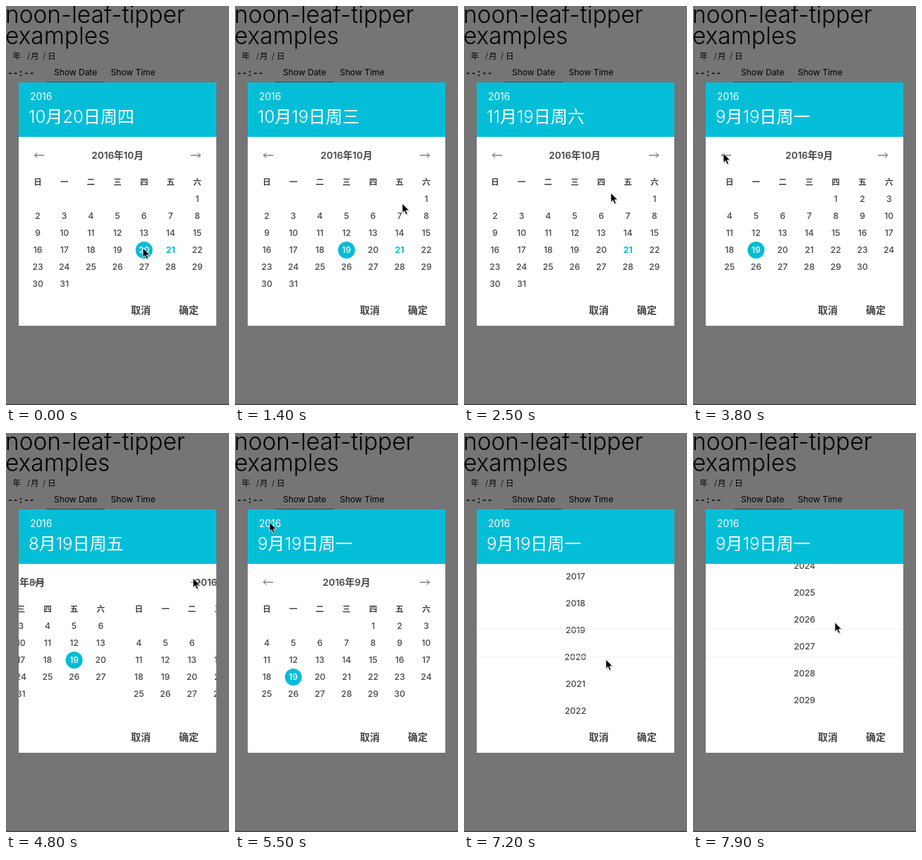
An HTML page for the animation above (8 s loop, 316x564 px).

```html
<!DOCTYPE html>
<html lang="zh">
<head>
<meta charset="utf-8">
<title>Date dialog</title>
<style>
  html, body { margin: 0; width: 100%; height: 100%; overflow: hidden; background: #757575; }
  svg { display: block; width: 316px; height: 564px; }
  text { font-family: Inter, "Noto Sans CJK SC", "Noto Sans CJK", sans-serif; white-space: pre; }
  .heading { font-size: 33.4px; font-weight: 300; }
  .button { font-size: 12px; }
  .field { font-size: 11.5px; font-weight: 300; }
  .clock { font: bold 12.8px "Liberation Mono", monospace; }
  .head { fill: #fff; }
  .date { font-size: 24px; font-weight: 350; }
  .year { font-size: 13.8px; }
  .mid { text-anchor: middle; fill: #444; }
  .title { font-size: 13.5px; font-weight: 600; }
  .week { font-size: 11.5px; font-weight: 600; }
  .cell { font-size: 12.2px; font-weight: 450; }
  .cell.now { fill: #04bcd6; font-weight: 700; }
  .cell.on { fill: #fff; }
  .action { font-size: 14px; font-weight: 600; fill: #444; }
  .arrow { fill: none; stroke: #444; }
</style>
</head>
<body>
<svg viewBox="0 0 316 564">
  <defs>
    <clipPath id="viewClip"><rect x="18" y="185" width="280" height="224"/></clipPath>
  </defs>
  <rect width="316" height="564" fill="#757575"/>
  <text class="heading" x="-1" y="24">noon-leaf-tipper</text>
  <text class="heading" x="-1" y="54">examples</text>
  <g class="field">
    <text x="9.5" y="75">年</text><text x="30" y="75">/</text>
    <text x="35" y="75">月</text><text x="52" y="75">/</text>
    <text x="59" y="75">日</text>
  </g>
  <text class="clock" x="2" y="99">--:--</text>
  <text class="button" x="68" y="98">Show Date</text>
  <text class="button" x="148.500" y="98">Show Time</text>
  <rect x="57" y="107" width="83" height="1" fill="#404040"/>
  <rect y="562.5" width="316" height="1.5" fill="#4b4045"/>

  <rect x="18" y="108" width="280" height="344" fill="#fff"/>
  <rect x="18" y="108" width="280" height="77" fill="#04bed8"/>
  <text class="head year" x="34" y="133">2016</text>
  <text class="head date" id="date" x="32" y="165"></text>

  <g clip-path="url(#viewClip)" id="view"></g>
  <g class="arrow" id="arrows">
    <path d="M54 211H40.500M44 207.500l-3.500 3.500 3.500 3.500"/>
    <path d="M262 211h13.500M272 207.500l3.500 3.500-3.500 3.500"/>
  </g>
  <g id="lines" fill="#f2f2f2">
    <rect x="18" y="277" width="280" height="1"/>
    <rect x="18" y="316" width="280" height="1"/>
  </g>
  <text class="action" x="177" y="435">取消</text>
  <text class="action" x="245" y="435">确定</text>

  <g id="cursor">
    <path d="M1 1.500V15l3-2.800 2 4.800 2.500-1-2-4.600h4.300z" opacity=".2"/>
    <path d="M0 0V13.500l3-2.800 2.100 5 2.400-1-2.100-4.800h4.300z" stroke="#fff" stroke-width=".9"/>
  </g>
</svg>
<script>
const LOOP = 8000, STEP = 100, WIDTH = 280, MOVE = 400;
const PICK_AT = 500, YEARS_AT = 5800, DRAG_AT = 6200, FLING_AT = 6600;
const WEEK = [...'日一二三四五六'];
const $ = id => document.getElementById(id);

// Month turns: two drags, then three clicks on the arrows
const turns = [
  { at: 1410, dur: 400, by: 1 },
  { at: 2018, dur: 500, by: -1 },
  { at: 3150, dur: 130, by: -1 },
  { at: 3788, dur: 130, by: -1 },
  { at: 4736, dur: 130, by: 1 }
];
// Where the pointer heads, and when it sets off
const moves = [
  { at: 100, x: 158, y: 345 },
  { at: 1000, x: 237, y: 279 },
  { at: 1410, x: 100, y: 268 },
  { at: 2050, x: 208, y: 264 },
  { at: 2650, x: 43, y: 208 },
  { at: 4200, x: 265, y: 205 },
  { at: 5080, x: 49, y: 126 },
  { at: YEARS_AT, x: 201, y: 260 }
];

// Smooth progress from 0 to 1
function ease(t, at, dur) {
  const u = Math.min(1, Math.max(0, (t - at) / dur));
  return u * u * (3 - 2 * u);
}

const label = (x, y, cls, s) => `<text class="mid ${cls}" x="${x}" y="${y}">${s}</text>`;
const colX = c => 45 + c * 37.667;

function monthPage(month, picked, day) {
  const lead = new Date(2016, month - 1, 1).getDay();
  const count = new Date(2016, month, 0).getDate();
  let out = label(158, 216, 'title', `2016年${month}月`);
  WEEK.forEach((w, c) => out += label(colX(c), 253, 'week', w));
  for (let d = 1; d <= count; d++) {
    const n = lead + d - 1;
    const x = colX(n % 7), y = 277 + 24 * Math.floor(n / 7);
    const on = month === picked && d === day;
    const now = month === 10 && d === 21;
    if (on) out += `<circle cx="${x}" cy="${y - 4}" r="12" fill="#04bcd6"/>`;
    out += label(x, y, on ? 'cell on' : now ? 'cell now' : 'cell', d);
  }
  return out;
}

function monthView(t, picked, day) {
  const pos = turns.reduce((p, { at, dur, by }) => p + by * ease(t, at, dur), 10);
  let out = '';
  for (let m = Math.floor(pos); m <= Math.ceil(pos); m++)
    out += `<g transform="translate(${(m - pos) * WIDTH})">${monthPage(m, picked, day)}</g>`;
  return out;
}

function yearView(t) {
  const mid = 2016 - 2.38 * ease(t, DRAG_AT, 200) + 13.26 * ease(t, FLING_AT, 1300);
  let out = '';
  for (let y = Math.floor(mid) - 3; y <= mid + 4; y++)
    out += label(158, 301.5 + (y - mid) * 38, y === 2016 ? 'cell now' : 'cell', y);
  return out;
}

function pointer(t) {
  let x = 194, y = 342;
  for (const m of moves) {
    const k = ease(t, m.at, MOVE);
    x += (m.x - x) * k;
    y += (m.y - y) * k;
  }
  if (t > DRAG_AT) y += 46 * (1 - Math.cos((t - DRAG_AT) / 435 * 2 * Math.PI));
  return [x, y];
}

function draw(t) {
  const month = turns.reduce((m, { at, dur, by }) => t >= at + dur ? m + by : m, 10);
  const day = t < PICK_AT ? 20 : 19;
  const inYears = t >= YEARS_AT;
  const weekday = WEEK[new Date(2016, month - 1, day).getDay()];
  $('date').textContent = `${month}月${day}日周${weekday}`;
  $('view').innerHTML = inYears ? yearView(t) : monthView(t, month, day);
  $('arrows').style.display = inYears ? 'none' : '';
  $('lines').style.display = inYears ? '' : 'none';
  $('cursor').setAttribute('transform', `translate(${pointer(t)})`);
}

const start = performance.now();
let shown = -1;
function tick() {
  const t = Math.floor(((performance.now() - start) % LOOP) / STEP) * STEP;
  if (t !== shown) draw(shown = t);
  requestAnimationFrame(tick);
}
tick();
</script>
</body>
</html>
```
